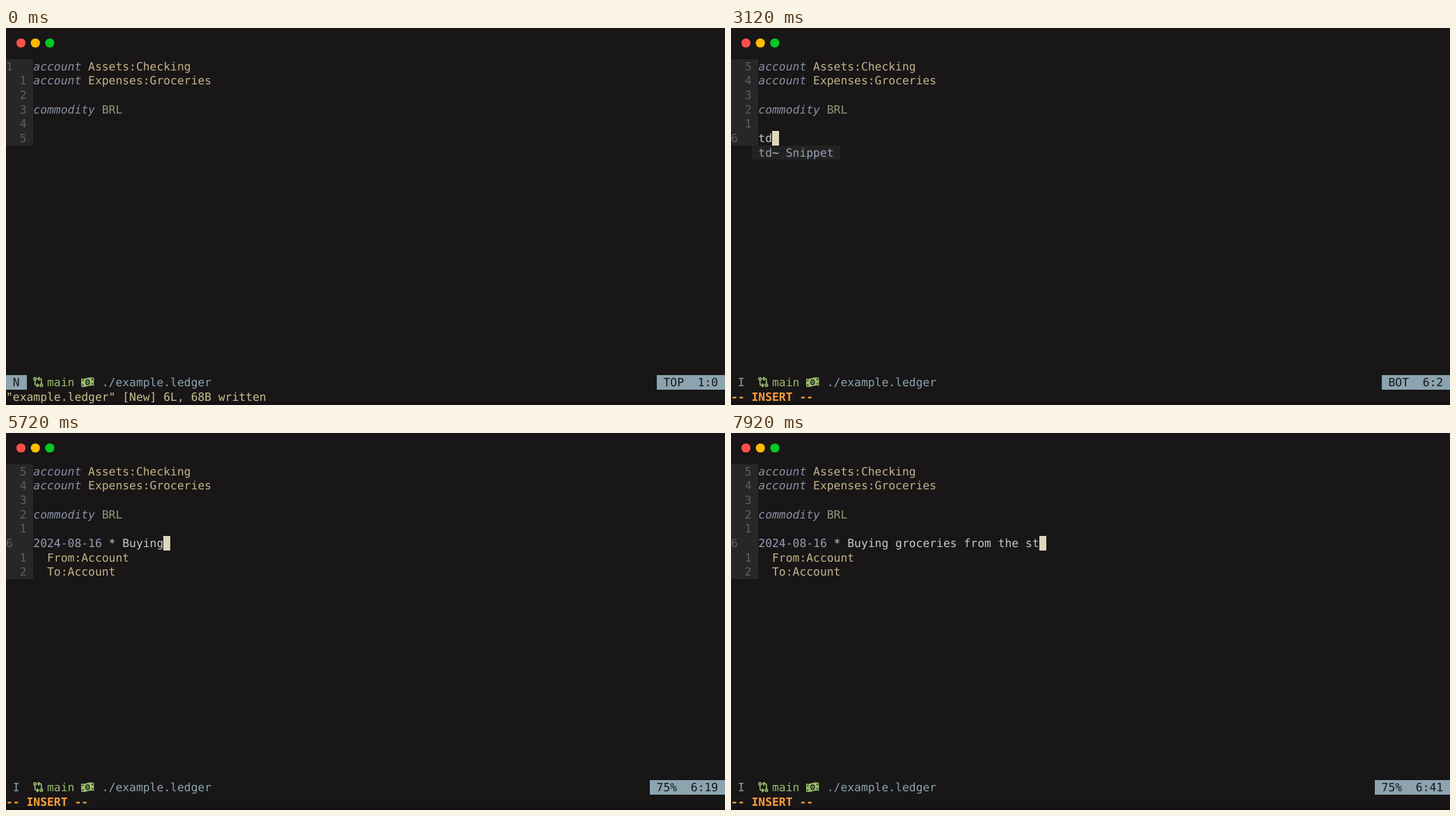
Write an HTML page with a canvas that moves like this. It is 1033 px wide and 542 px high and loops after 8 s.

```html
<!DOCTYPE html>
<html lang="en">
<head>
<meta charset="utf-8">
<title>Ledger editing</title>
<style>
html, body { margin: 0; width: 100%; height: 100%; overflow: hidden; background: #181616; }
canvas { display: block; width: 1033px; height: 542px; }
</style>
</head>
<body>
<canvas id="stage"></canvas>
<script>
const W = 1033, H = 542, LOOP = 8000, TICK = 40;
const CW = W / 105, RH = 20.65, TOP = 44.7, BASE = 15.9;
const GUTTER = 4, STATUS = 22, MESSAGE = 23;
const C = {
  bg: '#181616', edge: '#131111', gutter: '#282727', num: '#625e5a', fg: '#c5c9c5',
  keyword: '#8992a7', account: '#c4b28a', unit: '#8a9a7b', date: '#949fb5',
  blue: '#8ba4b0', green: '#98bb6c', cursor: '#dcd7ba', note: '#c8c093',
  insert: '#ff9e3b', menu: '#232222', select: '#223249'
};
const FONT = '16.34px "DejaVu Sans Mono", "Noto Sans Mono", monospace';
const PHRASE = 'Buying groceries from the store';
const WORDS = [['td~', 'Snippet'], ['BRL', 'Text'], ['Groceries', 'Text'], ['From', 'Text'], ['To', 'Text']];

const canvas = document.getElementById('stage');
const dpr = window.devicePixelRatio || 1;
canvas.width = Math.round(W * dpr);
canvas.height = Math.round(H * dpr);
const g = canvas.getContext('2d');

const cellX = col => col * CW;
const cellY = row => TOP + row * RH;

function fill(col, row, cols, color, rows = 1) {
  const x = Math.round(cellX(col)), y = Math.round(cellY(row));
  g.fillStyle = color;
  g.fillRect(x, y, Math.round(cellX(col + cols)) - x, Math.round(cellY(row + rows)) - y);
}

function text(str, col, row, color, style = '') {
  g.font = style + ' ' + FONT;
  g.fillStyle = color;
  [...str].forEach((ch, i) => {
    if (ch !== ' ') g.fillText(ch, cellX(col + i), cellY(row) + BASE);
  });
}

function disc(x, y, r, color) {
  g.fillStyle = color;
  g.beginPath();
  g.arc(x, y, r, 0, Math.PI * 2);
  g.fill();
}

// Keys pressed so far when typing at one key per 100 ms
const keys = (t, start) => t < start ? 0 : Math.floor((t - start) / 100) + 1;

function matches(typed) {
  const word = typed.split(' ').pop();
  if (!word) return null;
  const items = WORDS.filter(w => w[0].toLowerCase().startsWith(word.toLowerCase()));
  return items.length ? { items, hit: word.length, col: typed.length - word.length } : null;
}

// Editor state at time t
function state(t) {
  const s = { mode: 'N', line: 1, col: 0, at: 0, cursor: true, body: null, note: '', menu: null, sel: null };
  if (t < 2440) {
    s.line = 1 + Math.min(5, keys(t, 1940));
    s.cursor = t >= 1960 || t >= 1560 || (t >= 360 && t < 960);
    s.note = 'file';
    return s;
  }
  s.line = 6;
  if (t < 4200) {
    const typed = t < 3000 ? '' : t < 3120 ? 't' : 'td';
    s.mode = 'I';
    s.note = 'INSERT';
    s.col = s.at = typed.length;
    s.draft = typed;
    s.cursor = t < 3720;
    if (t >= 3040) s.menu = { items: [WORDS[0]], hit: typed.length, col: 0 };
    return s;
  }
  s.body = 'Payee';
  if (t < 4240) {
    s.col = 11;
  } else if (t < 5200) {
    s.mode = 'S';
    s.note = t < 4680 || t >= 4760 ? 'SELECT' : '';
    s.sel = t < 4680 ? [11, 1] : t < 4720 ? null : [13, 5];
    s.col = s.at = t < 4680 ? 11 : t < 4720 ? 13 : 17;
  } else {
    const n = keys(t, 5200);
    let typed = PHRASE.slice(0, n);
    s.mode = 'I';
    s.note = 'INSERT';
    s.col = 13 + n;
    // An open menu holds the text back for one tick when a space closes it
    const prev = PHRASE.slice(0, keys(t - TICK, 5200));
    if (typed.endsWith(' ') && matches(prev)) typed = prev;
    s.body = typed;
    s.at = 13 + typed.length;
    const m = matches(typed);
    if (m && (m.hit > 1 || prev === typed)) s.menu = { ...m, col: 13 + m.col };
  }
  return s;
}

function drawBuffer(s) {
  const count = s.body === null ? 6 : 8;
  fill(0, 0, GUTTER, C.gutter, count);
  for (let i = 0; i < count; i++) {
    const d = Math.abs(i + 1 - s.line);
    text(String(d || s.line), d ? 2 : 0, i, C.num);
  }
  ['Assets:Checking', 'Expenses:Groceries'].forEach((name, i) => {
    text('account', GUTTER, i, C.keyword, 'italic');
    text(name, GUTTER + 8, i, C.account);
  });
  text('commodity', GUTTER, 3, C.keyword, 'italic');
  text('BRL', GUTTER + 10, 3, C.unit);
  if (s.sel) fill(GUTTER + s.sel[0], 5, s.sel[1], C.select);
  if (s.draft) text(s.draft, GUTTER, 5, C.fg);
  if (s.body !== null) {
    text('2024-08-16', GUTTER, 5, C.date);
    text('* ' + s.body, GUTTER + 11, 5, C.fg);
    text('From:Account', GUTTER + 2, 6, C.account);
    text('To:Account', GUTTER + 2, 7, C.account);
  }
}

function drawCursor(s) {
  if (!s.cursor) return;
  const row = s.line - 1;
  const line = s.body === null
    ? ['account', 'account', '', 'commodity', '', s.draft || ''][row]
    : '2024-08-16 * ' + s.body;
  fill(GUTTER + s.at, row, 1, C.cursor);
  text(line[s.at] || '', GUTTER + s.at, row, C.bg);
}

function drawMenu({ items, hit, col }) {
  const wide = Math.max(...items.map(i => i[0].length));
  const kinds = Math.max(...items.map(i => i[1].length));
  const x = GUTTER + col;
  fill(x - 1, 6, wide + kinds + 3, C.menu, items.length);
  items.forEach(([word, kind], i) => {
    text(word.slice(0, hit), x, 6 + i, C.blue);
    text(word.slice(hit), x + hit, 6 + i, C.fg);
    text(kind, x + wide + 1, 6 + i, kind === 'Text' ? C.fg : C.date);
  });
}

function drawBranchIcon() {
  g.strokeStyle = C.green;
  g.lineWidth = 1.7;
  for (const turn of [0, Math.PI]) {
    g.save();
    g.translate(46.3, 509);
    g.rotate(turn);
    g.beginPath();
    g.arc(-4.6, -4.6, 1.7, 0, Math.PI * 2);
    g.moveTo(-4.6, -2.8);
    g.lineTo(-4.6, 2.6);
    g.quadraticCurveTo(-4.6, 4.8, -2.4, 4.8);
    g.lineTo(0, 4.8);
    g.moveTo(-1.8, 2.2);
    g.lineTo(0.6, 4.8);
    g.lineTo(-1.8, 7.2);
    g.stroke();
    g.restore();
  }
}

function drawNoteIcon() {
  g.fillStyle = C.green;
  g.beginPath();
  g.moveTo(108, 504);
  g.bezierCurveTo(114, 506, 119, 500.5, 126.3, 503);
  g.lineTo(126.3, 514.5);
  g.bezierCurveTo(120, 512.5, 114, 518, 108, 515.5);
  g.fill();
  g.fillStyle = C.bg;
  g.beginPath();
  g.ellipse(117.2, 509.2, 3.2, 4, 0, 0, Math.PI * 2);
  g.fill();
  g.strokeStyle = C.green;
  g.lineWidth = 1.3;
  g.beginPath();
  g.ellipse(117.2, 509.2, 1.2, 2.1, 0, 0, Math.PI * 2);
  g.stroke();
  disc(110.3, 513.3, 1.1, C.bg);
  disc(110.3, 506.8, 1, C.bg);
  disc(124, 505.2, 1.1, C.bg);
  disc(124, 511.6, 1, C.bg);
}

function drawStatus(s) {
  const normal = s.mode === 'N';
  if (normal) fill(0, STATUS, 3, C.blue);
  text(s.mode, 1, STATUS, normal ? C.bg : C.blue);
  drawBranchIcon();
  text('main', 6, STATUS, C.green);
  drawNoteIcon();
  text('./example.ledger', 14, STATUS, C.blue);

  const count = s.body === null ? 6 : 8;
  const place = s.line === 1 ? 'TOP' : s.line === count ? 'BOT' : Math.floor(s.line / count * 100) + '%';
  const info = ` ${place}  ${s.line}:${s.col} `;
  fill(105 - info.length, STATUS, info.length, C.blue);
  text(info, 105 - info.length, STATUS, C.bg);

  if (s.note === 'file') text('"example.ledger" [New] 6L, 68B written', 0, MESSAGE, C.note);
  else if (s.note) text(`-- ${s.note} --`, 0, MESSAGE, C.insert, 'bold');
}

function render(t) {
  const s = state(Math.floor(t / TICK) * TICK);
  g.setTransform(dpr, 0, 0, dpr, 0, 0);
  g.textBaseline = 'alphabetic';
  g.textRendering = 'geometricPrecision';
  g.fillStyle = C.bg;
  g.fillRect(0, 0, W, H);
  g.fillStyle = C.edge;
  g.fillRect(0, 538, W, H - 538);
  ['#ff4f4d', '#febb00', '#00ca24'].forEach((c, i) => disc(21.5 + i * 20.7, 21.5, 6.6, c));
  drawBuffer(s);
  drawCursor(s);
  if (s.menu) drawMenu(s.menu);
  drawStatus(s);
}

const start = performance.now();
function loop() {
  render((performance.now() - start) % LOOP);
  requestAnimationFrame(loop);
}
loop();
</script>
</body>
</html>
```
